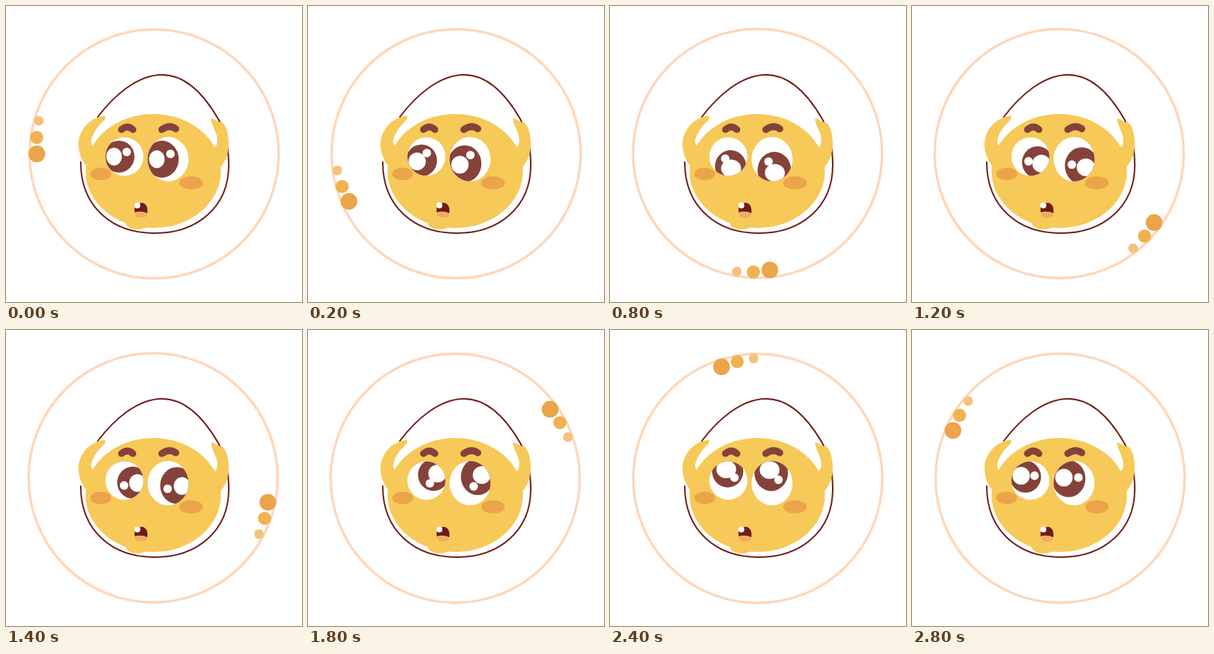
Recreate the animation shown at these times as an HTML page with a canvas. Size 400 by 400 pixels, loop 3000 ms.

```html
<!DOCTYPE html>
<html lang="en">
<head>
<meta charset="utf-8">
<title>Dizzy egg</title>
<style>
  html, body { margin: 0; width: 100%; height: 100%; overflow: hidden; background: #fff; }
  canvas { display: block; width: 400px; height: 400px; }
</style>
</head>
<body>
<canvas id="stage" width="400" height="400"></canvas>
<script>
const ctx = document.getElementById('stage').getContext('2d');
const LOOP = 3000, STEP = 200, RAD = Math.PI / 180;
const YELLOW = '#f6c958', BROWN = '#84423a', MAROON = '#701c17', ORANGE = '#eca44a';

function ellipse(x, y, rx, ry, color) {
  ctx.beginPath();
  ctx.ellipse(x, y, rx, ry, 0, 0, Math.PI * 2);
  ctx.fillStyle = color;
  ctx.fill();
}

function fillPath(d, color) {
  ctx.fillStyle = color;
  ctx.fill(new Path2D(d));
}

function strokePath(d, color, width) {
  ctx.strokeStyle = color;
  ctx.lineWidth = width;
  ctx.lineCap = 'round';
  ctx.stroke(new Path2D(d));
}

// The ring wobbles a little as the three dots run round it
function drawOrbit(gaze) {
  const cx = 199.5 - 0.7 * Math.cos(gaze), cy = 199.9 - 0.7 * Math.sin(gaze);
  ctx.beginPath();
  ctx.arc(cx, cy, 168.3, 0, Math.PI * 2);
  ctx.strokeStyle = '#ffd6b8';
  ctx.lineWidth = 3.3;
  ctx.stroke();
  ['#eca44a', '#f0b251', '#f4c17e'].forEach((color, i) => {
    const a = gaze + 8 * i * RAD, orbit = 158.5 + 1.8 * i;
    ellipse(cx + orbit * Math.cos(a), cy + orbit * Math.sin(a), 11.3 - 2.4 * i, 11.3 - 2.4 * i, color);
  });
}

function drawFace() {
  strokePath('M124 150C145 122 177 93 211 93C246 93 272 127 287 153C297 172 301 192 301 215C301 271 259 307 201 307C143 307 101 271 101 211', MAROON, 2);
  ellipse(199, 223, 91.5, 77, YELLOW);
  // Raised arms
  fillPath('M130 149C136 147 135 153 131 156C122 164 116 175 115 183C116 188 117 191 120 190L116 222C107 218 98 203 98 187C98 168 113 152 130 149Z', YELLOW);
  fillPath('M277 153C280 150 285 157 290 157C297 158 301 172 301 186C301 202 295 213 287 221L280 191C286 192 286 181 285 176C283 168 278 161 277 153Z', YELLOW);
  ellipse(178, 293, 16, 9, YELLOW);
  ellipse(128, 227, 14, 8.5, ORANGE);
  ellipse(250, 239, 16, 9, ORANGE);
  strokePath('M156 167Q164 160 171.5 167', BROWN, 9.2);
  strokePath('M210.5 167Q221 159.5 229.5 166', BROWN, 9.2);
  // Mouth
  fillPath('M174 279C172 269 178 266 184 266C190 267 192 273 191 280Q182 276 174 279Z', MAROON);
  ellipse(177.5, 269.5, 4, 4, '#fff');
  ellipse(182.5, 282, 8, 4, '#f0ac62');
}

// Pupil and large glint lean toward the leading dot, the small glint lies opposite
function drawEye(x, y, rx, ry, gaze) {
  const cos = Math.cos(gaze), sin = Math.sin(gaze), back = gaze + 150 * RAD;
  const pupilX = x + 2 + 0.37 * rx * cos, pupilY = y + 0.5 * ry * sin;
  ctx.save();
  ellipse(x, y, rx, ry, '#fff');
  ctx.clip();
  ellipse(pupilX, pupilY, 0.82 * rx, 0.83 * ry, BROWN);
  ellipse(x + 2 + 0.62 * rx * cos, y + 0.62 * ry * sin, 10.5 + 3 * Math.abs(sin), 12, '#fff');
  ellipse(pupilX + 0.48 * rx * Math.cos(back), pupilY + 0.48 * ry * Math.sin(back), 5.8, 5.8, '#fff');
  ctx.restore();
}

function draw(now) {
  const step = Math.floor(now % LOOP / STEP);
  const gaze = Math.PI - step * STEP / LOOP * Math.PI * 2;
  ctx.clearRect(0, 0, 400, 400);
  drawOrbit(gaze);
  drawFace();
  drawEye(160, 203.5, 25.7, 26, gaze);
  drawEye(219, 207, 27.7, 30, gaze);
  requestAnimationFrame(draw);
}

draw(performance.now());
</script>
</body>
</html>
```
